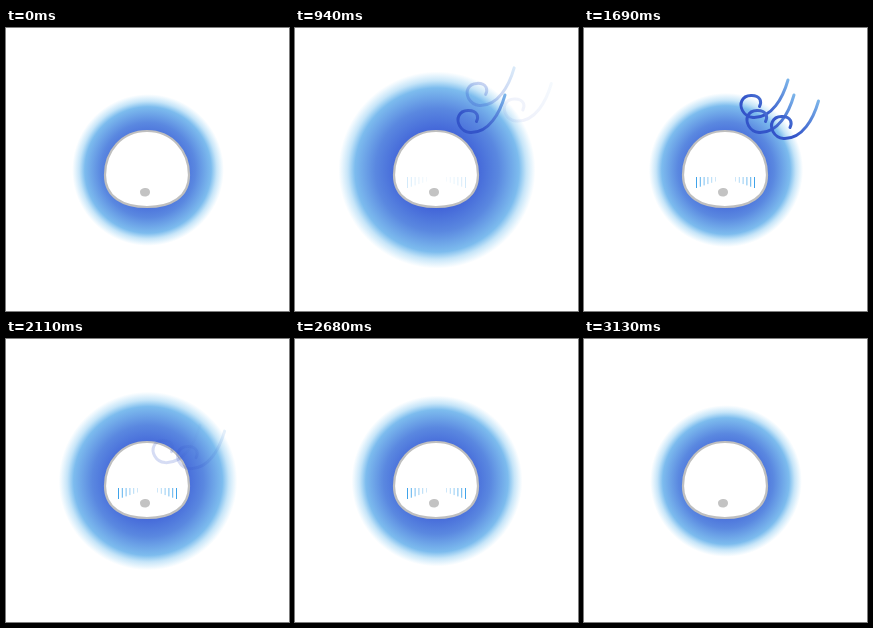
Recreate the animation shown at these times as an HTML page. Size 283x283 px, loop 3200 ms.

```html
<!DOCTYPE html>
<html lang="en">
<head>
<meta charset="utf-8">
<title>Shivering blob</title>
<style>
  html, body { margin: 0; width: 100%; height: 100%; overflow: hidden; background: #fff; }
  svg { display: block; width: 100%; height: 100%; }
</style>
</head>
<body>
<svg viewBox="0 0 283 283">
  <defs>
    <radialGradient id="aura">
      <stop offset=".36" stop-color="#4163d8"/>
      <stop offset=".6" stop-color="#5a88e0"/>
      <stop offset=".8" stop-color="#7dbcee"/>
      <stop offset=".87" stop-color="#80c4f0" stop-opacity=".45"/>
      <stop offset=".96" stop-color="#85ccf5" stop-opacity="0"/>
    </radialGradient>
    <linearGradient id="wind" gradientUnits="userSpaceOnUse" x1="204" y1="50" x2="176" y2="83">
      <stop offset="0" stop-color="#7db6ea"/>
      <stop offset="1" stop-color="#3354c9"/>
    </linearGradient>
    <path id="curl" fill="none" stroke="url(#wind)" stroke-width="3" stroke-linecap="round"
      d="M204 51.500C199 69 188 90 169 89C159 88 155 78 158 72C161 65.500 173 65.500 176 71C177.500 74 176.500 76 175.500 78"/>
  </defs>
  <circle id="glow" cx="142" cy="142" r="79" fill="url(#aura)"/>
  <path fill="#fff" stroke="#bfbfbf" stroke-width="2.200"
    d="M141 103C166 103 183 123 183 147C183 169 165 179 141 179C117 179 99 169 99 147C99 123 116 103 141 103Z"/>
  <g id="blush" stroke="#3fa3ea"></g>
  <path fill="#c3c3c3" d="M134 164C134 161 137 160 139.500 160C142 160 144 161.500 144 164C144 167 141.500 168.500 139 168.500C136 168.500 134 167 134 164Z"/>
  <g id="curls"></g>
</svg>
<script>
const LOOP = 3200, REST = 370, STEP = 30, LAST = 3130;
const $ = id => document.getElementById(id);

function add(parent, tag, attrs) {
  const el = document.createElementNS('http://www.w3.org/2000/svg', tag);
  for (const k in attrs) el.setAttribute(k, attrs[k]);
  return parent.appendChild(el);
}

// Linear interpolation through [time, value] pairs
function track(points, t) {
  if (t <= points[0][0]) return points[0][1];
  for (let i = 1; i < points.length; i++) {
    const [a, x] = points[i - 1], [b, y] = points[i];
    if (t <= b) return x + (y - x) * (t - a) / (b - a);
  }
  return points[points.length - 1][1];
}

const radius = [[370, 79], [950, 103], [1700, 80], [2270, 98], [3130, 79]];
const blushing = [[880, 0], [1150, 1], [2720, 1], [3010, 0]];

// Resting offset, then entry and exit times
const curls = [
  { x: 0, y: 0.5, enter: [685, 1200], leave: [1690, 2100] },
  { x: 6, y: 15.5, enter: [420, 935], leave: [1700, 2215] },
  { x: 30.5, y: 21.5, enter: [800, 1315], leave: [1700, 2215] }
];
for (const c of curls) c.el = add($('curls'), 'use', { href: '#curl' });

for (let i = 0; i < 6; i++) {
  for (const side of [-1, 1]) {
    const x = 141.5 + side * (29 - i * 3.8);
    add($('blush'), 'line', { x1: x, x2: x, y1: 149, y2: 160 - i * 1.3, opacity: 1 - i * .15 });
  }
}

function draw(t) {
  $('glow').setAttribute('r', track(radius, t));
  $('blush').setAttribute('opacity', track(blushing, t));
  for (const c of curls) {
    const away = track([[c.enter[0], 1], [c.enter[1], 0]], t);
    const gone = track([[c.leave[0], 0], [c.leave[1], 1]], t);
    const x = c.x + 30 * away - 20 * gone;
    const y = c.y - 24 * away + 24 * gone;
    c.el.setAttribute('transform', `translate(${x} ${y})`);
    c.el.setAttribute('opacity', (1 - away ** 2.5) * (1 - away) ** .5 * (1 - gone) * (away > .5 ? 1 - away : 1));
  }
}

const start = performance.now();
function tick() {
  const t = (performance.now() - start) % LOOP;
  const stepped = t < REST ? 0 : REST + Math.floor((t - REST) / STEP) * STEP;
  draw(Math.min(stepped, LAST));
  requestAnimationFrame(tick);
}
tick();
</script>
</body>
</html>
```
